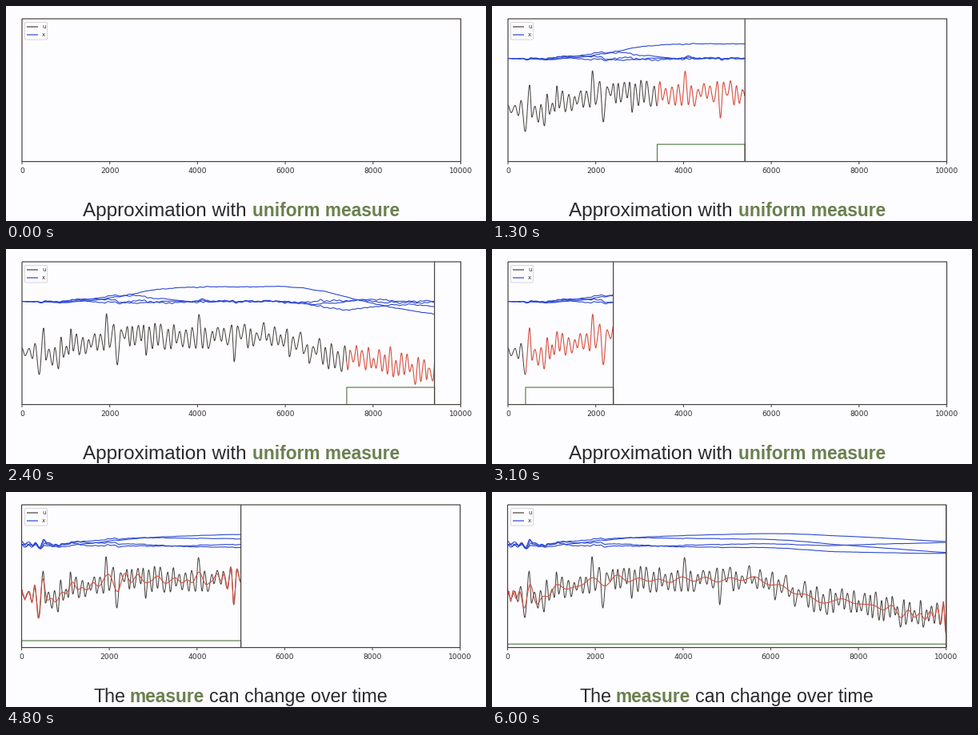
Write a matplotlib script that moves like this. It is 600 px wide and 269 px high and loops after 6.1 s.

```python
import random

import matplotlib.pyplot as plt
import numpy as np
from matplotlib.animation import FuncAnimation
from matplotlib.patches import FancyBboxPatch
from numpy.polynomial import legendre

W, H, DPI = 600, 269, 100
PT = 72 / DPI
FRAMES, STEP_MS, SWITCH = 61, 100, 35
END, DT, WINDOW, ORDER = 10000, 4, 2000, 63
TOP, BOTTOM = 16, 194.6
U_ZERO, X_ZERO = 128, 65.6

BG, INK, DARK = "#fdfcfe", "#2b292b", "#45413d"
RED, BLUE, GREEN, LEAF = "#d4503f", "#2b48d2", "#5d7f4d", "#6b804f"

# Slow course of the input and its tallest swings, in pixels.
TREND = [(20, 128), (60, 130), (100, 118), (150, 107), (320, 109),
         (400, 132), (450, 141), (568, 157)]
SWINGS = [(20, 124), (41.5, 157), (47, 99), (65.5, 150), (81, 100),
          (99.5, 131), (125.5, 81), (139, 145), (151.5, 97), (175, 133),
          (186, 93), (206, 125), (241, 82), (285, 141), (322, 92),
          (354, 135), (368, 104), (403, 150), (438, 121), (480, 125),
          (511, 169), (568, 178)]
RIPPLE = 3.8


def trend(x):
    return np.interp(x, *zip(*TREND))


def turning_points():
    """Join the tall swings with seeded ripples about the trend."""
    rng = random.Random(7)
    pts = [SWINGS[0]]
    for (x0, y0), (x1, y1) in zip(SWINGS, SWINGS[1:]):
        gap = x1 - x0
        low = y0 > trend(x0)
        flip = int(low != (y1 > trend(x1)))
        n = max(2 - flip, 2 * round((gap / RIPPLE - flip) / 2) + flip)
        for k in range(1, n):
            x = x0 + gap * (k + rng.uniform(-0.25, 0.25)) / n
            side = 1 if (k % 2 == 0) == low else -1
            pts.append((x, trend(x) + side * rng.uniform(3, 18)))
        pts.append((x1, y1))
    return np.array(pts).T


def make_signal(t):
    px, py = turning_points()
    x = 20 + 548 * t / END
    k = np.clip(np.searchsorted(px, x, side="right") - 1, 0, len(px) - 2)
    s = (x - px[k]) / (px[k + 1] - px[k])
    y = py[k] + (py[k + 1] - py[k]) * (1 - np.cos(np.pi * s)) / 2
    return U_ZERO - y


def coefficients(u, window=None):
    """First four Legendre coefficients of the past, for every time."""
    norm = np.sqrt(2 * np.arange(4) + 1)
    out = np.zeros((len(u), 4))
    for i in range(len(u)):
        n = window or i + 1
        past = u[max(0, i + 1 - n):i + 1]
        s = 1 - 2 * (np.arange(len(past))[::-1] + 0.5) / n
        out[i] = norm * (past @ legendre.legvander(s, 3)) / n
    return out


def approximate(u):
    deg = min(ORDER, len(u) // 4)
    s = np.linspace(-1, 1, len(u))
    return legendre.legval(s, legendre.legfit(s, u, deg))


time = np.arange(0, END + DT, DT)
signal = make_signal(time)
sliding = coefficients(signal, WINDOW // DT)
scaled = coefficients(signal)

fig = plt.figure(figsize=(W / DPI, H / DPI), dpi=DPI, facecolor=BG)
ax = fig.add_axes([0, 0, 1, 1])
ax.set_xlim(0, W)
ax.set_ylim(H, 0)
ax.axis("off")


def line(color, width, z, x=(), y=()):
    return ax.plot(x, y, color=color, lw=width * PT, zorder=z, snap=False,
                   solid_joinstyle="round", solid_capstyle="butt")[0]


def text(x, y, s, size, color=INK, font="DejaVu Sans", **kw):
    return ax.text(x, y, s, fontsize=size * PT, color=color, family=font,
                   zorder=9, **kw)


def caption(size, parts):
    return [text(x, 263, s, 22.7 if bold else size, LEAF if bold else INK,
                 "Liberation Sans", weight="bold" if bold else "normal")
            for x, s, bold in parts]


frame_box = line(DARK, 1.2, 7)
ticks = [line(DARK, 1, 7) for _ in range(6)]
labels = [text(0, 206.5, str(2000 * k), 9.1, ha="center", va="center")
          for k in range(6)]

ax.add_patch(FancyBboxPatch((24.5, 21.5), 26, 19.5, fc=BG, ec="#d3d1d4",
                            lw=0.9 * PT, zorder=8,
                            boxstyle="round,pad=1,rounding_size=1.5"))
for y, name, color in ((26, "u", DARK), (36, "x", BLUE)):
    line(color, 1.2, 9, (26, 40), (y, y))
    text(45, y + 2.3, name, 7)

titles = [
    caption(24.3, [(95.5, "Approximation with", False),
                   (307.5, "uniform measure", True)]),
    caption(23.3, [(109.5, "The", False), (154.5, "measure", True),
                   (253.5, "can change over time", False)]),
]

u_line = line(DARK, 1, 3)
fit_line = line(RED, 1.1, 4)
x_lines = [line(BLUE, 1.1, 3) for _ in range(4)]
measure = line(GREEN, 1.2, 5)
front = line(DARK, 1.2, 6)

# Frame number and the simulated time it shows.
CLOCK = [(0, 0), (13, 5400), (24, 9400), (25, 0), (34, 3600), (35, 0),
         (40, 2000), (48, 5000), (60, 10000)]


def now(i):
    return 200 * round(float(np.interp(i, *zip(*CLOCK))) / 200)


def draw(i):
    second = i >= SWITCH
    left, right = (19.5, 567.7) if second else (20, 568.5)

    def to_x(t):
        return left + (right - left) * t / END

    frame_box.set_data([left, right, right, left, left],
                       [TOP, TOP, BOTTOM, BOTTOM, TOP])
    for k in range(6):
        x = to_x(2000 * k)
        ticks[k].set_data([x, x], [BOTTOM, BOTTOM + 3.5])
        labels[k].set_x(x)
    for k, title in enumerate(titles):
        for part in title:
            part.set_visible(k == int(second))

    t = now(i)
    start = 0 if second else max(0, t - WINDOW)
    a, b = start // DT, t // DT + 1
    running = t > 0
    for art in (u_line, fit_line, measure, front, *x_lines):
        art.set_visible(running)
    if not running:
        return

    # The sliding window is fitted closely enough to hide the input.
    xs = to_x(time[:b])
    seen = b if t > WINDOW and second else a + 1
    u_line.set_data(xs[:seen], U_ZERO - signal[:seen])
    fit_line.set_data(xs[a:], U_ZERO - approximate(signal[a:b]))
    states = scaled if second else sliding
    for k, art in enumerate(x_lines):
        art.set_data(xs, X_ZERO - states[:b, k])

    height = 21.5 * WINDOW / t if second else 21.5
    roof = max(TOP, BOTTOM - height)
    x0, x1 = to_x(start), to_x(t)
    measure.set_data([x0, x0, x1, x1], [BOTTOM, roof, roof, BOTTOM])
    front.set_data([x1, x1], [TOP, BOTTOM])


anim = FuncAnimation(fig, draw, frames=FRAMES, interval=STEP_MS,
                     init_func=lambda: draw(0), repeat=True, repeat_delay=0)
plt.show()
```
